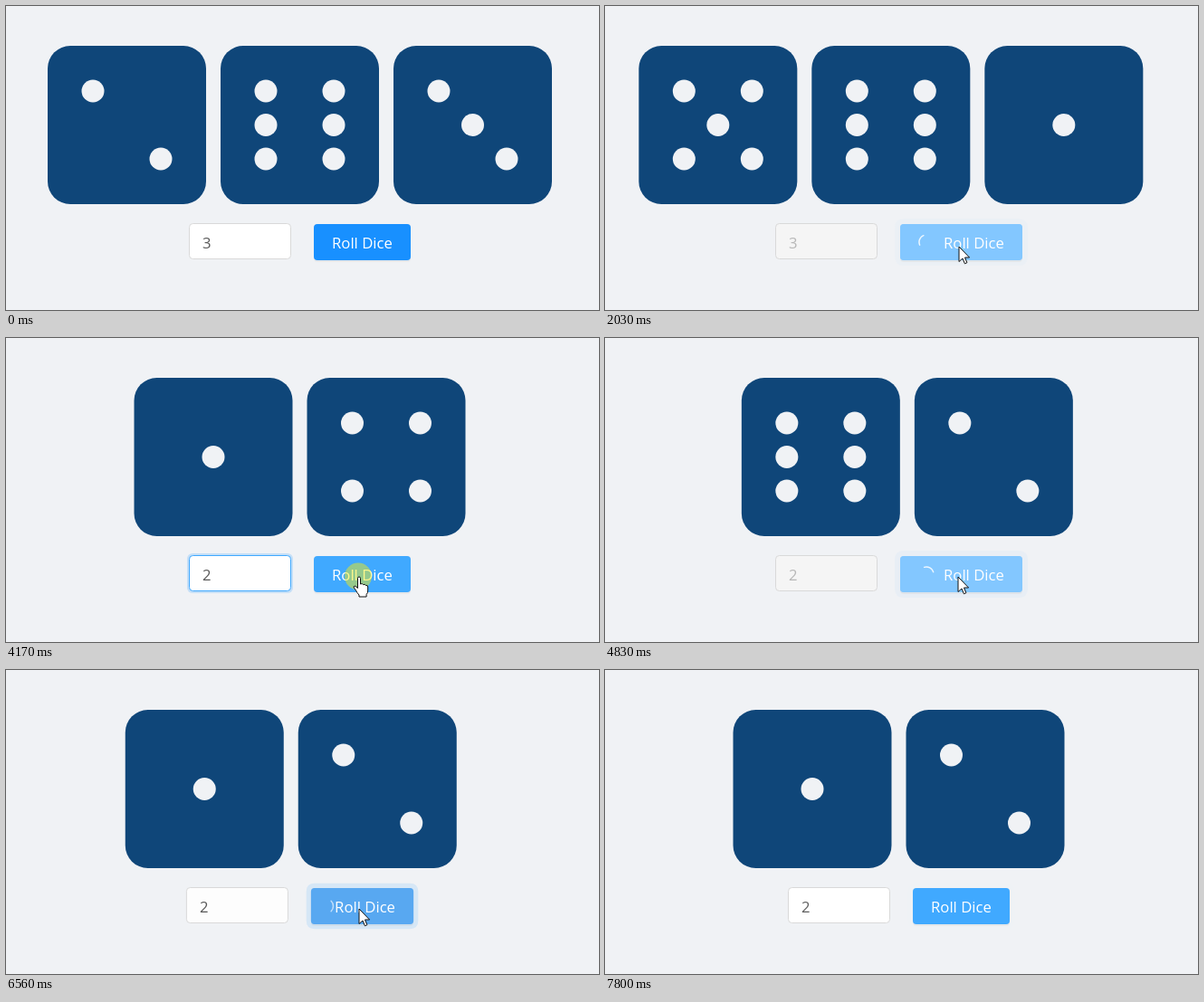
Write an HTML page that moves like this. It is 655 px wide and 336 px high and loops after 8.32 s.

```html
<!DOCTYPE html>
<html lang="en">
<head>
<meta charset="utf-8">
<title>Dice roller</title>
<style>
  html, body { margin: 0; height: 100%; overflow: hidden; background: #f0f2f5; }
  svg { display: block; width: 655px; height: 336px; }
  text { font: 16.7px "Open Sans", "Noto Sans", sans-serif; }
  .die rect { fill: #0f4679; }
  .die circle { fill: #f0f2f5; }
  .pointer path { fill: #fff; stroke: #111; stroke-width: 1; stroke-linejoin: round; }
  .line { fill: none; stroke: #d9d9d9; }
  .chevron { fill: none; stroke: #8c8c8c; stroke-width: 1.1; }
</style>
</head>
<body>
<svg viewBox="0 0 655 336">
  <g id="dice"></g>
  <g id="field">
    <rect id="glow" x="-2" y="238" width="117" height="44" rx="6" fill="#1890ff"/>
    <rect id="box" x=".5" y="240.5" width="112" height="39" rx="4"/>
    <text id="count" x="15" y="268"></text>
    <g id="spin">
      <path class="line" d="M84.5 241V279"/>
      <path class="line" id="divider" d="M84.5 0H112"/>
      <path class="chevron" id="up" d="M-3.5 2L0 -2L3.5 2"/>
      <path class="chevron" id="down" d="M-3.5 -2L0 2L3.5 -2"/>
    </g>
  </g>
  <g id="button">
    <path id="ring" fill="#1890ff" fill-rule="evenodd"/>
    <rect id="drop" y="243" height="40" rx="4" opacity=".045"/>
    <rect id="face" y="241" height="40" rx="4"/>
    <rect id="veil" y="241" height="40" rx="4" fill="#fff"/>
    <path id="loader" d="M5.66 -5.66A8 8 0 0 1 5.66 5.66" fill="none" stroke="#fff" stroke-width="1.5" stroke-linecap="round"/>
    <text id="label" y="268" fill="#fff">Roll Dice</text>
  </g>
  <circle id="press" r="15" fill="#fff000" opacity=".45"/>
  <g id="pointer" class="pointer">
    <path id="arrow" d="M0 0V16.5L4 13L6.4 18.8L8.9 17.7L6.5 12H11.6Z"/>
    <path id="hand" d="M-1.5 1.5a1.5 1.5 0 0 1 3 0V8q2-1.2 3 .6q2-.8 2.8.8q2.4-.6 2.4 1.6v4q0 3-1.6 4.5V22H0v-2q-2-2-3.5-5q-1.6-2.4-2.2-3q-.8-1.8 1.2-1.8q1.4.3 3 2.3Z"/>
  </g>
</svg>
<script>
const LOOP = 8320, MID = 324.5, DIE = 175, GAP = 16, SWING = 12.5;
const FIELD_W = 113, BTN_W = 107, ICON_W = 28;

// Each roll: start, length, first angle of the loader
const rolls = [
  { at: 1360, len: 980, turn: -40 },
  { at: 4370, len: 1190, turn: 132 },
  { at: 6450, len: 1000, turn: -40 },
];
const faces = [[0, [2, 6, 3]], [1360, [5, 6, 1]], [3320, [1, 4]], [4370, [6, 2]], [6450, [1, 2]]];
const presses = [[1020, 1340], [3120, 3320], [4150, 4360], [6250, 6440]];
const path = [
  [170, 494, 338], [820, 391, 266], [2180, 391, 266], [2460, 283, 279],
  [2900, 300, 266], [3660, 300, 266], [4080, 390, 264], [7480, 390, 264], [7790, 486, 340],
];
const pips = ['', '3', '06', '036', '0246', '02346', '012456'];
const spots = [[50, 50], [50, 87.5], [50, 125], [87.5, 87.5], [125, 50], [125, 87.5], [125, 125]];

const $ = {};
document.querySelectorAll('[id]').forEach(el => $[el.id] = el);
const set = (el, attrs) => { for (const k in attrs) el.setAttribute(k, attrs[k]); };
const show = (el, on) => set(el, { visibility: on ? 'visible' : 'hidden' });
const clamp = v => Math.min(1, Math.max(0, v));
const mix = (a, b, p) => a + (b - a) * p;
const blend = (a, b, p) => a.map((v, i) => mix(v, b[i], p));
const rgb = c => `rgb(${c.map(Math.round)})`;
const move = (x, y = 0) => `translate(${x} ${y})`;

function bezier(x1, y1, x2, y2) {
  const axis = (a, b, u) => 3 * a * u * (1 - u) ** 2 + 3 * b * u * u * (1 - u) + u ** 3;
  return v => {
    v = clamp(v);
    if (v === 0 || v === 1) return v;
    let lo = 0, hi = 1;
    for (let i = 0; i < 24; i++) {
      const m = (lo + hi) / 2;
      if (axis(x1, x2, m) < v) lo = m; else hi = m;
    }
    return axis(y1, y2, lo);
  };
}
const inOut = bezier(.645, .045, .355, 1);
const wave = bezier(.08, .82, .17, 1);
const ramp = (t, at, len = 300) => inOut((t - at) / len);
const pulse = (t, a, b, len = 300) => ramp(t, a, len) - ramp(t, b, len);

// Left, right, left ... with straight segments of a tenth each
function shake(p) {
  if (p <= 0 || p >= 1) return 0;
  const at = i => i === 0 || i === 10 ? 0 : i % 2 ? -SWING : SWING;
  const i = Math.floor(p * 10);
  return mix(at(i), at(i + 1), p * 10 - i);
}

function pointerAt(t) {
  const i = path.findIndex(k => k[0] > t);
  if (i < 1) return null;
  const [a, ax, ay] = path[i - 1], [b, bx, by] = path[i];
  const u = (t - a) / (b - a), p = u * u * (3 - 2 * u);
  return [mix(ax, bx, p), mix(ay, by, p)];
}

$.dice.innerHTML = [0, 1, 2].map(() =>
  `<g class="die"><rect width="${DIE}" height="${DIE}" rx="25"/>` +
  spots.map(([x, y]) => `<circle cx="${x}" cy="${y}" r="12.5"/>`).join('') + '</g>').join('');
const dice = [...$.dice.children];

function drawDice(t, roll) {
  const values = faces.filter(f => f[0] <= t).pop()[1];
  const dx = roll ? shake((t - roll.at) / roll.len) : 0;
  const left = MID - (values.length * (DIE + GAP) - GAP) / 2 + dx;
  dice.forEach((die, i) => {
    set(die, { display: i < values.length ? 'inline' : 'none', transform: move(left + i * (DIE + GAP), 44) });
    const on = pips[values[i] || 0];
    spots.forEach((_, n) => set(die.children[n + 1], { opacity: on.includes(n) ? 1 : 0 }));
  });
  return values.length;
}

function drawField(t, x, off, dim, count) {
  const hover = pulse(t, 2380, 3700, 200);
  const focus = pulse(t, 3120, 4370);
  const bg = 255 - 10 * off;
  set($.field, { transform: move(x) });
  set($.glow, { opacity: .2 * focus });
  set($.box, {
    fill: rgb([bg, bg, bg]),
    stroke: rgb(blend([217, 217, 217], [64, 169, 255], Math.max(hover, focus))),
  });
  $.count.textContent = count;
  set($.count, { fill: `rgba(0,0,0,${mix(.65, .25, dim)})` });

  // The hovered half of the stepper grows
  const over = pulse(t, 2640, 3680, 240);
  set($.spin, { opacity: hover });
  set($.divider, { transform: move(0, 260.5 - 4 * over) });
  set($.up, { transform: move(98.5, 251.5 - 2 * over) });
  set($.down, {
    transform: move(98.5, 270 - 2 * over),
    style: `stroke:${rgb(blend([140, 140, 140], [64, 169, 255], over))}`,
  });
}

function drawButton(t, x, roll, load) {
  const w = BTN_W + ICON_W * load;
  const since = roll ? t - roll.at : 9999;
  const busy = roll ? pulse(t, roll.at, roll.at + roll.len, 200) : 0;
  const base = blend([24, 144, 255], [64, 169, 255], ramp(t, 600));
  const held = roll ? .6 * (1 - ramp(since, 0)) : 0;
  set($.button, { transform: move(x) });
  for (const el of [$.drop, $.face, $.veil]) set(el, { width: w });
  set($.face, { fill: rgb(blend(base, [9, 109, 217], held)) });
  set($.veil, { opacity: .35 * busy });

  const s = 6 * wave(since / 400), r = 4 + s;
  const frame = (a, b, c, d, q) =>
    `M${a + q} ${b}H${c - q}Q${c} ${b} ${c} ${b + q}V${d - q}Q${c} ${d} ${c - q} ${d}H${a + q}Q${a} ${d} ${a} ${d - q}V${b + q}Q${a} ${b} ${a + q} ${b}Z`;
  set($.ring, {
    d: frame(-s, 241 - s, w + s, 281 + s, r) + frame(0, 241, w, 281, 4),
    opacity: .2 * (1 - wave(since / 2000)),
  });

  const running = roll && since < roll.len;
  const fade = running ? Math.min(1, .5 + load) : clamp(1 - (since - (roll ? roll.len : 0)) / 100);
  const angle = roll ? roll.turn + since * .36 : 0;
  set($.loader, {
    transform: `${move(13 + 16 * load, 261)} rotate(${angle})`,
    opacity: load > 0 ? .85 * fade : 0,
  });
  set($.label, { x: 20 + ICON_W * load });
}

function drawPointer(t, loading) {
  const at = pointerAt(t);
  show($.arrow, false);
  show($.hand, false);
  show($.press, false);
  if (!at) return;
  const [x, y] = at;
  const onButton = !loading && x > 340 && x < 447 && y > 241 && y < 281;
  const onStep = x > 286 && x < 315 && y > 241 && y < 279 && t > 2500;
  const hand = onButton || onStep;
  set($.pointer, { transform: move(x, y) });
  show(hand ? $.hand : $.arrow, true);
  set($.press, { cx: x - 1, cy: y - .5 });
  show($.press, presses.some(([a, b]) => t >= a && t < b));
}

function draw(t) {
  const roll = rolls.filter(r => r.at <= t).pop();
  const end = roll && roll.at + roll.len;
  const load = roll ? pulse(t, roll.at, end) : 0;
  const dim = roll ? pulse(t, roll.at + 120, end + 120) : 0;
  const left = MID - (FIELD_W + 25 + BTN_W + ICON_W * load) / 2;
  const count = drawDice(t, roll);
  drawField(t, left, load, dim, count);
  drawButton(t, left + FIELD_W + 25, roll, load);
  drawPointer(t, roll && t < end);
}

const start = performance.now();
function tick() {
  draw((performance.now() - start) % LOOP);
  requestAnimationFrame(tick);
}
tick();
</script>
</body>
</html>
```
